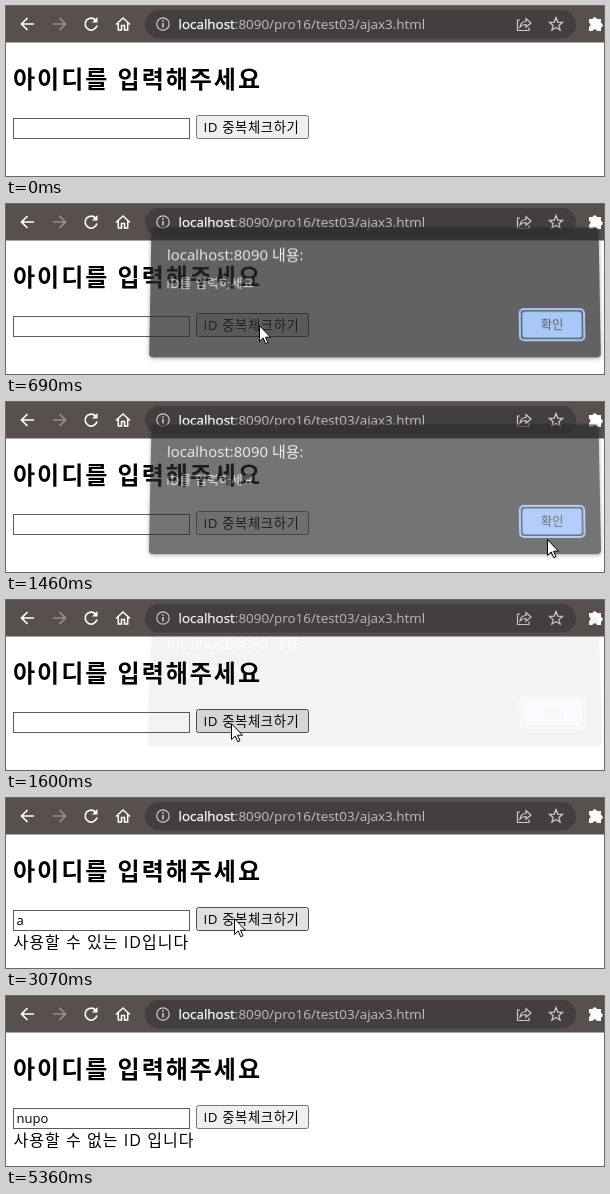
Animation, 598 px wide and 170 px high, one loop 5.49 s. Source, as an HTML page:

```html
<!DOCTYPE html>
<html lang="ko">
<head>
<meta charset="utf-8">
<title>ID check</title>
<style>
  html, body { margin: 0; width: 100%; height: 100%; overflow: hidden; background: #fff; }
  svg { position: absolute; left: 0; top: 0; overflow: visible; }
  text { font-family: "Open Sans", "Noto Sans CJK KR", sans-serif; white-space: pre; }
  #dialog { left: 145px; top: 33px; filter: drop-shadow(0 1px 2px rgba(0,0,0,.45)); }
  .icon { fill: none; stroke: #fff; stroke-width: 1.7; }
  .faint { fill: none; stroke: #cfcbc9; stroke-width: 1.2; }
</style>
</head>
<body>
<svg width="598" height="170" viewBox="0 0 598 170">
  <rect width="598" height="36.500" fill="#57504d"/>
  <rect x="139" y="4" width="431" height="28.500" rx="14.250" fill="#433f40"/>
  <g class="icon">
    <path d="M28 18H16M21.500 12L15.500 18L21.500 24"/>
    <path d="M47 18H59M53.500 12L59.500 18L53.500 24" stroke="#9c8f88"/>
    <path d="M89.800 14.200A6 6 0 1 0 91 19.500"/>
    <path d="M91.500 11V16.500H86Z" fill="#fff" stroke="none"/>
    <path d="M110 18.500L117 12L124 18.500M112.300 17V24H115.500V19.500H118.500V24H121.700V17" stroke-width="1.500"/>
  </g>
  <g class="faint">
    <circle cx="157" cy="18" r="6.200"/>
    <path d="M157 17V21.500M157 14.300V15.700" stroke-width="1.600"/>
    <path d="M514 14H511.500V24.500H523V21.500M514 21C514.500 17 517 15.500 520 15.500V12.500L525 17L520 21.300V18.500C517.500 18.500 515.500 19 514 21Z"/>
    <path id="star"/>
  </g>
  <path d="M583 13H586.500A2.300 2.300 0 0 1 591 13H595V17A2.300 2.300 0 0 1 595 21.500V25H591A2.300 2.300 0 0 0 586.500 25H583V21A2.300 2.300 0 0 0 583 16.700Z" fill="#fff"/>
  <text x="172.500" y="23" font-size="13.440" fill="#c3bfbd"><tspan fill="#fff" stroke="#fff" stroke-width=".25">localhost</tspan>:8090/pro16/test03/ajax3.html</text>

  <text x="7" y="82" font-size="24" font-weight="700" letter-spacing="2">아이디를 입력해주세요</text>
  <rect id="field" fill="#fff"/>
  <text id="typed" x="10.500" y="127" font-size="13"></text>
  <path id="caret" stroke="#000"/>
  <rect id="button" x="190.500" y="109.500" width="112" height="23" rx="2"/>
  <text x="197.500" y="126" font-size="13.330" letter-spacing=".6">ID 중복체크하기</text>
  <text id="message" x="7.500" y="150" font-size="16" letter-spacing="1.050"></text>
</svg>

<svg id="dialog" width="448" height="130" viewBox="145 33 448 130">
  <rect x="145" y="33" width="448" height="130" rx="4" fill="#292a2d"/>
  <text x="161" y="66" font-size="15" fill="#e8eaed">localhost:8090 내용:</text>
  <text x="161" y="94" font-size="12.300" letter-spacing=".5" fill="#e8eaed">ID를 입력하세요</text>
  <rect x="513" y="115" width="64" height="31" rx="4" fill="none" stroke="#8ab4f8" stroke-width="2"/>
  <rect x="515.500" y="117.500" width="59" height="26" rx="3" fill="#8ab4f8"/>
  <text x="545" y="135" font-size="12.300" fill="#202124" text-anchor="middle">확인</text>
</svg>

<svg width="598" height="170" viewBox="0 0 598 170">
  <g id="pointer">
    <circle id="halo" cy="2" r="12.500" fill="#f8f24e" opacity=".75"/>
    <path id="arrow" d="M.5 .7V16.500L4.200 13L6.700 18.700L9 17.700L6.500 12.200H11.500Z" fill="#fff" stroke="#000"/>
    <path id="beam" d="M-3 -7.500H-1L0 -6.500L1 -7.500H3M0 -6.500V6.500M-3 7.500H-1L0 6.500L1 7.500H3" fill="none" stroke="#000"/>
  </g>
</svg>

<script>
const LOOP = 5490, TICK = 70, PRESS = 130;

const start = { x: 240, y: 139 };
const moves = [
  { at: 60, time: 70, x: 253, y: 121 },
  { at: 830, time: 280, x: 541, y: 137 },
  { at: 1460, time: 280, x: 120, y: 118 },
  { at: 2130, time: 200, x: 228, y: 120 },
  { at: 3070, time: 140, x: 120, y: 113 },
  { at: 3620, time: 200, x: 255, y: 112 },
  { at: 4610, time: 70, x: 262, y: 114 },
  { at: 4900, time: 70, x: 280, y: 162 }
];

// Each click lasts PRESS; its result follows on release.
const clicks = [
  { at: 340, on: 'button', opens: true },
  { at: 1250, on: 'ok', closes: true },
  { at: 1810, on: 'field', word: 'a', from: 2080 },
  { at: 2350, on: 'button', reply: '사용할 수 있는 ID입니다' },
  { at: 3210, on: 'field', word: 'nupo', from: 3620 },
  { at: 4230, on: 'button', reply: '사용할 수 없는 ID 입니다' }
];
const opened = clicks.find(c => c.opens).at + PRESS;
const closed = clicks.find(c => c.closes).at + PRESS;

const $ = id => document.getElementById(id);
const set = (id, attrs) => {
  for (const k in attrs) $(id).setAttribute(k, attrs[k]);
};
const show = (id, on) => { $(id).style.display = on ? '' : 'none'; };
const clamp = v => Math.max(0, Math.min(1, v));
const easeOut = p => 1 - (1 - p) ** 2;
const snap = t => Math.floor((t - 60) / TICK) * TICK + 60;

function pointerAt(t) {
  return moves.reduce((p, m) => {
    const f = easeOut(clamp((t - m.at) / m.time));
    return { x: p.x + (m.x - p.x) * f, y: p.y + (m.y - p.y) * f };
  }, start);
}

function drawDialog(t) {
  const alpha = Math.min(clamp((t - opened) / 298), clamp(1 - (t - closed) / 234));
  const tilt = (1 - alpha) ** .45;
  const box = $('dialog').style;
  show('dialog', alpha > 0);
  box.opacity = alpha;
  box.transform = tilt
    ? `translateY(${-18 * tilt}px) perspective(1200px) translateZ(${7 * tilt}px) rotateX(${10 * tilt}deg)`
    : 'none';
}

function drawField(t) {
  const focused = clicks.filter(c => c.at <= t).pop()?.on === 'field';
  const entry = clicks.filter(c => c.word && c.at + PRESS <= t).pop();
  const count = entry ? Math.max(0, Math.floor((t - entry.from) / TICK) + 1) : 0;
  const inset = focused ? 1 : .5;
  set('field', {
    x: 7 + inset, y: 112 + inset, width: 177 - 2 * inset, height: 21 - 2 * inset,
    rx: focused ? 1.5 : 0, stroke: focused ? '#101010' : '#5c5c5c', 'stroke-width': 2 * inset
  });
  $('typed').textContent = entry ? entry.word.slice(0, count) : '';
  const end = 11.5 + Math.round($('typed').getComputedTextLength());
  set('caret', { d: `M${end} 115V130` });
  show('caret', focused);
}

function draw(t) {
  const { x, y } = pointerAt(snap(t));
  const visible = t >= 70 && t < 4890 || t >= 5290 && t < 5360;
  const pressed = clicks.some(c => t >= c.at && t < c.at + PRESS);
  const over = visible && x >= 190 && x < 303 && y >= 109 && y < 133;
  const inField = x > 7 && x < 184 && y > 111 && y < 133;
  const [fill, stroke] = !over ? ['#efefef', '#767676']
    : pressed ? ['#f5f5f5', '#8d8d8d'] : ['#e0e0e0', '#4f4f4f'];
  const answer = clicks.filter(c => c.reply && c.at + PRESS <= t).pop();

  set('button', { fill, stroke });
  set('pointer', { transform: `translate(${Math.round(x)} ${Math.round(y)})` });
  show('pointer', visible);
  show('halo', pressed);
  show('arrow', !inField);
  show('beam', inField);
  $('message').textContent = answer ? answer.reply : '';
  drawField(t);
  drawDialog(snap(t));
}

set('star', {
  d: 'M' + Array.from({ length: 10 }, (_, i) => {
    const r = i % 2 ? 3 : 7, a = Math.PI * (i / 5 - .5);
    return `${550 + r * Math.cos(a)} ${18.5 + r * Math.sin(a)}`;
  }).join('L') + 'Z'
});

const began = performance.now();
function tick() {
  draw((performance.now() - began + .01) % LOOP);
  requestAnimationFrame(tick);
}
tick();
</script>
</body>
</html>
```
